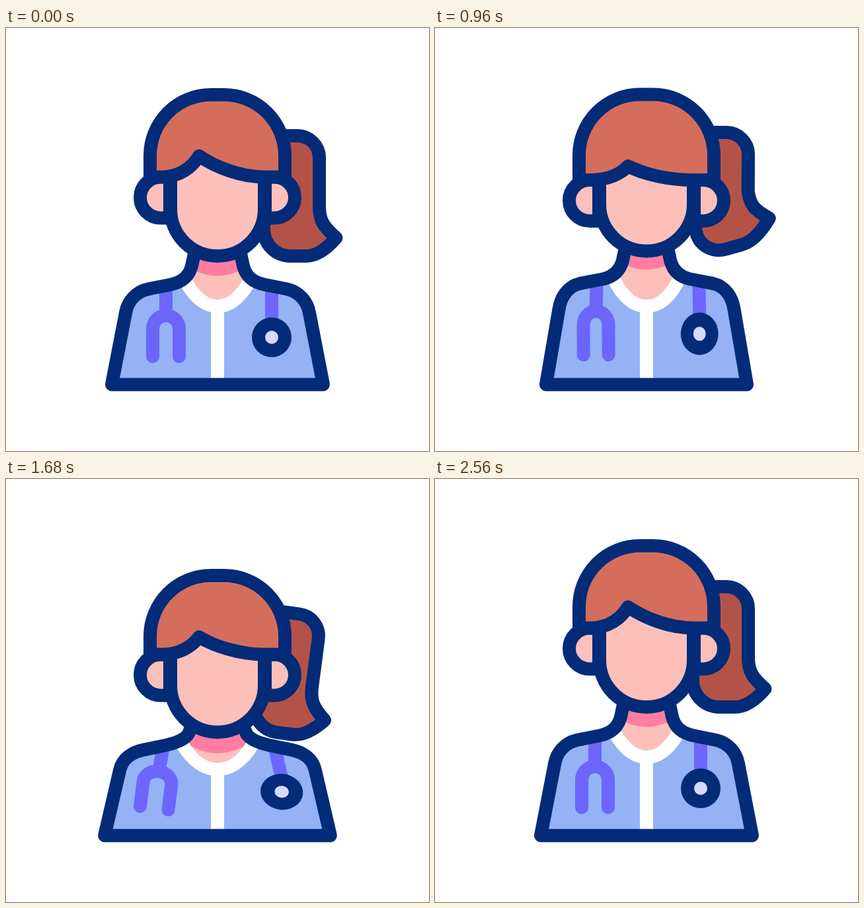
Animation of 640x640 px, one loop 2.88 s. Source, as an HTML page with a canvas:

```html
<!DOCTYPE html>
<html lang="en">
<head>
<meta charset="utf-8">
<title>Nurse</title>
<style>
  html, body { margin: 0; width: 100%; height: 100%; overflow: hidden; background: #fff; }
  canvas { display: block; width: 100vmin; height: 100vmin; }
</style>
</head>
<body>
<canvas id="stage" width="640" height="640"></canvas>
<script>
const ctx = document.getElementById('stage').getContext('2d');
const LOOP = 2880, STEP = 20, SIZE = 640, MID = 320;
const NAVY = '#032b77', SKIN = '#fdbfba', BLUSH = '#ff7da0', HAIR = '#d56d5d', TAIL = '#b35348',
      SHIRT = '#94b2f4', TUBE = '#6c66fb', LENS = '#d3dbfd', WHITE = '#fff';

// time, crown, face, fringe, chin, shoulders, tail turn, tail curl, swing
const KEYS = [
  [220],
  [420, 51.5, 53, 3.5, 48.5, 20, 6.5, 0, -13],
  [470, 54, 55, 2, 50, 21.5, 6, 2, -11],
  [740, 0, -8, 0, -6, -1, -3, 1, 8],
  [840, -14, -20, 2, -20, -8, -7, -8, 9],
  [960, -0.5, 4.5, 11, -7.5, -9, 0, -15.5, 1.5],
  [1060, 1, 6, 6, -3, -4, 2, -8, -3],
  [1280, -4, -4, 0, -4, -3, -0.5, 0, 0],
  [1480, -14.5, -22.5, 3.5, -22.5, -10, 1, 3, 3.5],
  [1680, 45, 40, 5.5, 38, 16, 7.5, 0, -13],
  [1840, 15, 8, 0, 10, 4, 3, 3, -4],
  [2020, -7.5, -20, 1, -15.5, -6.5, -0.5, -6, 11.5],
  [2130, -6, -10, 4, -12, -8, -7, -9, 6],
  [2250, 0, 3, 4, -4, -4, -3, -12, -2],
  [2380, 1, 2, 1, 0, 0, -2, -6, -1.5],
  [2560]
];
const NAMES = ['time', 'crown', 'face', 'fringe', 'chin', 'body', 'turn', 'curl', 'swing'];
const value = (k, c) => KEYS[k][c] || 0;
const slope = (k, c) => (value(k + 1, c) - value(k, c)) / (KEYS[k + 1][0] - KEYS[k][0]);

// Tangent that never overshoots a key
function tangent(k, c) {
  if (k === 0 || k === KEYS.length - 1) return 0;
  const a = slope(k - 1, c), b = slope(k, c);
  return a * b <= 0 ? 0 : 2 * a * b / (a + b);
}

function poseAt(time) {
  const t = Math.min(Math.max(time, KEYS[0][0]), KEYS[KEYS.length - 1][0]);
  let k = 0;
  while (k < KEYS.length - 2 && t >= KEYS[k + 1][0]) k++;
  const span = KEYS[k + 1][0] - KEYS[k][0], u = (t - KEYS[k][0]) / span, v = 1 - u;
  const pose = {};
  for (let c = 1; c < NAMES.length; c++) {
    pose[NAMES[c]] = value(k, c) * v * v * (1 + 2 * u) + value(k + 1, c) * u * u * (3 - 2 * u)
      + span * u * v * (tangent(k, c) * v - tangent(k + 1, c) * u);
  }
  pose.wide = pose.body * (pose.body < 0 ? 1.3 : 1);
  return pose;
}

const mirror = ([x, y]) => [SIZE - x, y];
const rad = deg => deg * Math.PI / 180;

function rotate([x, y], [cx, cy], deg) {
  const c = Math.cos(rad(deg)), s = Math.sin(rad(deg)), dx = x - cx, dy = y - cy;
  return [cx + dx * c - dy * s, cy + dx * s + dy * c];
}

function curve(path, a, b, c) {
  path.bezierCurveTo(...a, ...b, ...c);
}

function paint(path, fill, line = NAVY, width = 20) {
  if (fill) { ctx.fillStyle = fill; ctx.fill(path); }
  if (line) { ctx.strokeStyle = line; ctx.lineWidth = width; ctx.stroke(path); }
}

function drawTail(p) {
  const dy = (p.crown + p.chin) / 2 - 0.1 * Math.abs(p.body);
  const bend = Math.tan(rad(p.curl));
  const upper = (x, y) => {
    const [rx, ry] = rotate([x, y], [430, 163], p.turn);
    return [rx + p.turn * 0.45, ry + dy];
  };
  const lower = (x, y) => upper(x - bend * (y - 272) * 0.5, y + bend * (x - 410));
  const path = new Path2D();
  path.moveTo(...upper(400, 163));
  path.lineTo(...upper(441, 163));
  curve(path, upper(459, 163), upper(474, 178), upper(474, 196));
  path.lineTo(...lower(474, 270));
  curve(path, lower(474, 292), lower(481, 301), lower(499.5, 317.5));
  curve(path, lower(487, 332), lower(472, 345), lower(454, 345));
  path.lineTo(...lower(430, 345));
  curve(path, lower(408, 345), lower(390, 327), lower(390, 305));
  path.lineTo(...upper(390, 250));
  path.closePath();
  paint(path, TAIL);
}

function bodyPath(p) {
  const b = p.body, c = p.chin;
  const foot = [160 - 0.68 * p.wide, 539.5];
  const arm = [181 - 0.55 * p.wide, 431 + 0.58 * b];
  const round = [[184 - 0.52 * p.wide, 413 + 0.7 * b], [197 - 0.48 * b, 399 + 0.92 * b]];
  const shoulder = [215 - 0.45 * b, 395 + 0.93 * b];
  const base = [250 - 0.5 * b, 388 + 0.92 * b];
  const bend = [[268 - 0.5 * b, 384 + 0.92 * b], [277 - 0.35 * b, 375 + 1.12 * b]];
  const neck = [281 - 0.3 * b, 360 + 0.5 * c + 0.4 * b];
  const top = [287 - 0.3 * b, 332 + c];
  const path = new Path2D();
  path.moveTo(...foot);
  path.lineTo(...arm);
  curve(path, ...round, shoulder);
  path.lineTo(...base);
  curve(path, ...bend, neck);
  path.lineTo(...top);
  path.lineTo(...mirror(top));
  path.lineTo(...mirror(neck));
  curve(path, mirror(bend[1]), mirror(bend[0]), mirror(base));
  path.lineTo(...mirror(shoulder));
  curve(path, mirror(round[1]), mirror(round[0]), mirror(arm));
  path.lineTo(...mirror(foot));
  path.closePath();
  return path;
}

function drawCollar(p) {
  const b = p.body, drop = Math.max(0, 1.15 * b), spread = Math.abs(b);
  const start = [273 - 0.4 * spread, 386 + 0.95 * b];
  const a = [288 - 0.3 * spread, 411 + drop], c = [303, 421 + drop];
  const edge = new Path2D();
  edge.moveTo(...start);
  curve(edge, a, c, [MID, 421 + drop]);
  curve(edge, mirror(c), mirror(a), mirror(start));
  const neck = new Path2D(edge);
  neck.lineTo(SIZE - start[0], 280);
  neck.lineTo(start[0], 280);
  paint(neck, SKIN, null);

  const low = 375 + p.chin - 0.4 * (p.face - p.crown);
  const shade = new Path2D();
  shade.moveTo(270, low - 17);
  shade.quadraticCurveTo(MID, low + 17, 370, low - 17);
  shade.lineTo(370, low - 70);
  shade.lineTo(270, low - 70);
  paint(shade, BLUSH, null);

  paint(edge, null, WHITE);
  ctx.fillStyle = WHITE;
  ctx.fillRect(310, 421 + drop, 20, 120);
}

function drawStethoscope(p) {
  const b = p.body, w = p.swing;
  const sx = 1 + 0.0045 * p.wide, sy = 1 - 0.006 * p.wide, dy = b * (b < 0 ? 0.6 : 0.33);
  const angle = -0.062 * w * Math.abs(w) - 0.02 * w * w;
  const fork = [242 + w, 455 + dy], disc = [402 - 1.17 * w, 468 + dy];
  const place = (x, y) => rotate([fork[0] + x * sx, fork[1] + y * sy], fork, angle);

  const hang = (x, end) => {
    const tube = new Path2D();
    tube.moveTo(x, 389 + b);
    tube.quadraticCurveTo(x + (end[0] - x) * 0.25, 408 + b * 0.7, ...end);
    paint(tube, null, TUBE);
  };
  hang(242 - 0.3 * b, place(0, -20));
  hang(402 + 0.3 * b, [disc[0], disc[1] - 20]);

  const prongs = new Path2D();
  prongs.moveTo(...place(-20, 42));
  prongs.lineTo(...place(-20, 0));
  curve(prongs, place(-20, -11), place(-11, -20), place(0, -20));
  curve(prongs, place(11, -20), place(20, -11), place(20, 0));
  prongs.lineTo(...place(20, 42));
  paint(prongs, null, TUBE);

  const oval = (r, color) => {
    const path = new Path2D();
    path.ellipse(...disc, r * sx, r * sy, rad(angle), 0, 2 * Math.PI);
    paint(path, color, null);
  };
  oval(30, NAVY);
  oval(10, LENS);
}

function drawBody(p) {
  const path = bodyPath(p);
  ctx.save();
  ctx.clip(path);
  paint(path, SHIRT, null);
  drawCollar(p);
  drawStethoscope(p);
  ctx.restore();
  paint(path, null);
}

function drawHead(p) {
  const e = p.face;
  for (const side of [-1, 1]) {
    const ear = new Path2D(), x = MID + side * 86, y = 256.5 + e;
    ear.moveTo(MID + side * 72, y - 31);
    ear.lineTo(x, y - 31);
    ear.arc(x, y, 31, -Math.PI / 2, Math.PI / 2, side < 0);
    ear.lineTo(MID + side * 72, y + 31);
    ear.closePath();
    paint(ear, SKIN);
  }

  const face = new Path2D();
  face.moveTo(391, 198 + e);
  face.arc(MID, 274 + p.chin, 71, 0, Math.PI);
  face.lineTo(249, 198 + e);
  paint(face, SKIN);

  const hair = new Path2D(), hem = 225.5 + e, dome = 193 + p.crown;
  hair.moveTo(218, hem);
  hair.arc(310, dome, 92, Math.PI, 1.5 * Math.PI);
  hair.arc(330, dome, 92, 1.5 * Math.PI, 2 * Math.PI);
  hair.lineTo(422, hem);
  hair.lineTo(391, hem);
  curve(hair, [355, hem], [318, hem - 14.5 + p.fringe * 0.6], [292, hem - 32 + p.fringe]);
  curve(hair, [281, hem - 13.5 + p.fringe * 0.4], [262, hem - 1], [238, hem]);
  hair.closePath();
  paint(hair, HAIR);
}

function frame(now) {
  const pose = poseAt(Math.floor(now % LOOP / STEP) * STEP);
  ctx.fillStyle = WHITE;
  ctx.fillRect(0, 0, SIZE, SIZE);
  ctx.lineJoin = ctx.lineCap = 'round';
  drawTail(pose);
  drawBody(pose);
  drawHead(pose);
  requestAnimationFrame(frame);
}
requestAnimationFrame(frame);
</script>
</body>
</html>
```
